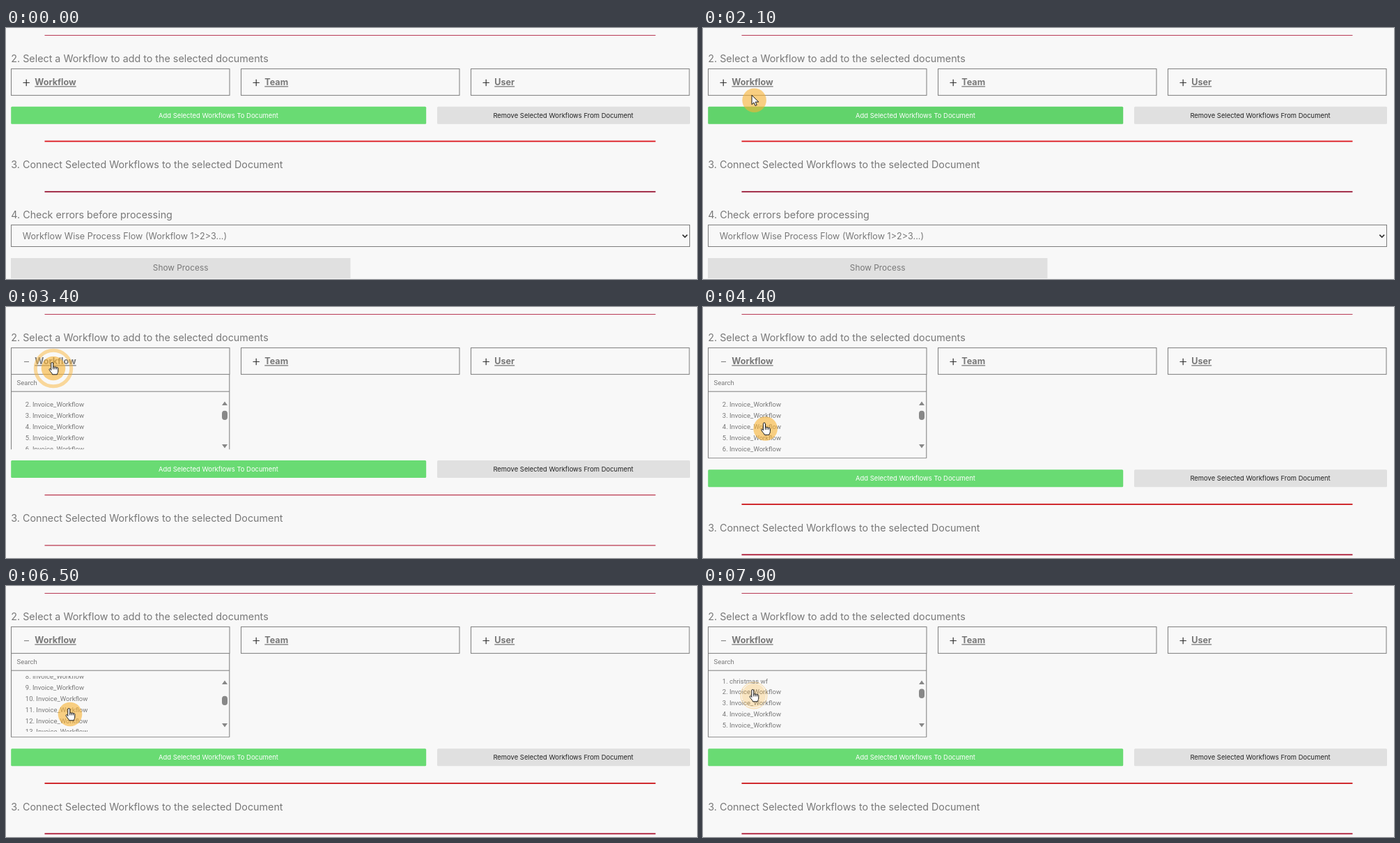
Recreate the animation shown at these times as an HTML page. Size 992x360 px, loop 8000 ms.

```html
<!DOCTYPE html>
<html lang="en">
<head>
<meta charset="utf-8">
<title>Workflow selection</title>
<style>
html, body { margin: 0; width: 100%; height: 100%; overflow: hidden; background: #f8f8f8; }
svg { display: block; width: 992px; height: 360px; }
text { font-family: Inter, "Liberation Sans", sans-serif; fill: #787878; white-space: pre; }
.head { font-size: 14.3px; }
.title { font-size: 12.6px; font-weight: 700; text-decoration: underline; }
.field { font-size: 12.6px; }
.small { font-size: 9.45px; text-anchor: middle; }
.show { font-size: 11.85px; text-anchor: middle; }
.item { font-family: Roboto, "Liberation Sans", sans-serif; font-size: 9.5px; }
.box { fill: none; stroke: #7d7d7d; }
.sign { fill: none; stroke: #333; stroke-width: 1.2; }
.grey { fill: #e0e0e0; }
.bar { fill: #888; }
.glow { fill: #f9b233; }
.ring { fill: none; stroke: #f9b233; }
.pointer { fill: #fff; stroke: #151515; stroke-linejoin: round; stroke-linecap: round; }
</style>
</head>
<body>
<svg viewBox="0 0 992 360">
  <defs>
    <clipPath id="panelClip"><rect id="panelArea" x="0" y="97" width="330" height="0"/></clipPath>
    <clipPath id="listClip"><rect x="8" y="129" width="300" height="80"/></clipPath>
  </defs>

  <rect x="55.5" y="10" width="877" height="1" fill="#b83a55"/>
  <text class="head" x="7.3" y="48.6">2. Select a Workflow to add to the selected documents</text>

  <g id="cards"></g>
  <path id="minus" class="sign" d="M26 78.5h7" style="stroke:#888"/>

  <g clip-path="url(#panelClip)">
    <path class="box" d="M7.5 96v120.8h313.3V96M7.5 121.2h313.3"/>
    <text class="item" x="15.6" y="111.8">Search</text>
    <g clip-path="url(#listClip)"><g id="list"></g></g>
    <path class="bar" d="M310 141l4-5.4 4 5.4zM310 197l4 5.4 4-5.4z"/>
    <rect id="thumb" class="bar" x="310" width="8" height="13.4" rx="4"/>
  </g>

  <g id="below">
    <rect id="add" x="7.2" y="112.8" width="596" height="25" rx="1.5"/>
    <text class="small" x="305" y="128.8" style="fill:#fff">Add Selected Workflows To Document</text>
    <rect class="grey" x="619" y="112.8" width="363" height="25" rx="1.5"/>
    <text class="small" x="800" y="128.8" style="fill:#222">Remove Selected Workflows From Document</text>
    <rect id="rule2" x="55.5" width="877"/>
    <text class="head" x="7.3" y="201.1">3. Connect Selected Workflows to the selected Document</text>
    <rect id="rule3" x="55.5" width="877"/>
    <text class="head" x="7.3" y="273.2">4. Check errors before processing</text>
    <rect class="box" x="7.5" y="282.5" width="974" height="31"/>
    <text class="field" x="23.7" y="303">Workflow Wise Process Flow (Workflow 1&gt;2&gt;3...)</text>
    <path class="sign" d="M971.3 296.6l3.4 3.4 3.4-3.4" style="stroke-width:1.7"/>
    <rect class="grey" x="7" y="330" width="487.5" height="29"/>
    <text class="show" x="250.6" y="348.2">Show Process</text>
  </g>

  <circle id="ring" class="ring"/>
  <g id="cursor">
    <circle id="glow" class="glow" r="17.3"/>
    <path id="arrow" class="pointer" d="M-3.6-7v13l3-2.8 2 4.6 2.2-1-2-4.4h4.2z"/>
    <path id="hand" class="pointer" d="M-3.2 2V-7a1.5 1.5 0 0 1 3 0V-1.6a1.4 1.4 0 0 1 2.4 0 1.4 1.4 0 0 1 2.4.6 1.3 1.3 0 0 1 2.2 1V4c0 2.4-1.4 3-1.4 4.8H-1.4C-1.6 7-4 5.4-5.7 2.4-6.4.8-4.8-.6-3.2 2zM-.2-1.6v2.6M2.2-1.6v2.6M4.6-1v2"/>
  </g>
</svg>
<script>
const LOOP = 8000, STEP = 100, OPEN = 120.5, ROW = 15.87, CLICK = 2800;
const $ = id => document.getElementById(id);
const show = (id, on) => { $(id).style.display = on ? '' : 'none'; };
const set = (el, attrs) => { for (const k in attrs) el.setAttribute(k, attrs[k]); };

function add(parent, tag, attrs, text = '') {
  const el = document.createElementNS('http://www.w3.org/2000/svg', tag);
  set(el, attrs);
  el.textContent = text;
  $(parent).append(el);
}

// Progress from 0 to 1 between two times
const part = (t, from, to) => Math.min(1, Math.max(0, (t - from) / (to - from)));
const easeOut = (t, from, to) => 1 - (1 - part(t, from, to)) ** 2.4;
function smooth(t, from, to) {
  const p = part(t, from, to);
  return p * p * (3 - 2 * p);
}

['Workflow', 'Team', 'User'].forEach((name, i) => {
  const x = 7.5 + 330 * i;
  add('cards', 'rect', { class: 'box', x, y: 58.6, width: 313.5, height: 38 });
  add('cards', 'path', {
    id: 'plus' + i, class: 'sign', d: `M${x + 17} 78.5h9.4m-4.7-4.7v9.4`
  });
  add('cards', 'text', { class: 'title', x: x + 33.8, y: 82.3 }, name);
});

for (let n = 1; n <= 20; n++) {
  const name = n === 1 ? 'christmas wf' : 'Invoice_Workflow';
  add('list', 'text', { class: 'item', x: 27.8, y: 139.6 + (n - 1) * ROW }, `${n}. ${name}`);
}

// Three glides: to the heading, into the list, up to the first rows
function cursorAt(t) {
  const a = easeOut(t, 1100, 2600), b = easeOut(t, 3700, 4830), c = easeOut(t, 7300, 7800);
  return [147 - 79 * a + 24 * b - 19 * c, 307 - 219 * a + 96 * b - 27 * c];
}

const scrollAt = t => 12 - 12 * smooth(t, 4600, 5100) + 88 * smooth(t, 5300, 5800)
  + 62 * smooth(t, 5900, 6200) - 150 * smooth(t, 6200, 7200);

function rule(id, mid, colour, moving) {
  const height = moving ? 1.2 : 1.8;
  set($(id), { y: mid - height / 2, height, fill: moving ? '#b83048' : colour });
}

function drawPanel(t) {
  const shift = OPEN * easeOut(t, 2950, 3700);
  const open = shift === OPEN, moving = shift > 0 && !open;
  const top = scrollAt(t), dark = 8 * (smooth(t, 1800, 2000) - smooth(t, 2100, 2400));
  show('plus0', t < 2900);
  show('minus', t >= 2900);
  set($('panelArea'), { height: shift });
  set($('below'), { transform: `translate(0 ${shift})` });
  set($('list'), { transform: `translate(0 ${-top})` });
  set($('thumb'), { y: 147.6 + top * .086 });
  set($('add'), { fill: `rgb(${105 - dark},${219 - dark},${115 - dark})` });
  rule('rule2', 162.5, open ? '#cc161a' : '#dc161c', moving);
  rule('rule3', 234.8, open ? '#ac1834' : '#981634', moving);
}

function drawCursor(t) {
  const [x, y] = cursorAt(t);
  const start = t > CLICK + 5000 ? CLICK + 5000 : CLICK;
  const age = t - start;
  show('cursor', t >= 1100);
  show('arrow', t < 2300);
  show('hand', t >= 2300);
  set($('cursor'), { transform: `translate(${x} ${y})` });
  set($('glow'), { opacity: .6 - .32 * (part(age, 0, 100) - part(age, 100, 300)) });

  const [cx, cy] = cursorAt(start), width = 5 * part(age, 0, 500);
  show('ring', age > 0 && age < 1250);
  set($('ring'), {
    cx, cy, r: Math.max(0, 17.7 + .0175 * age - width / 2), 'stroke-width': width,
    opacity: .48 * (1 - part(age, 600, 1250))
  });
}

function frame(now) {
  const t = Math.floor(now % LOOP / STEP) * STEP;
  drawPanel(t);
  drawCursor(t);
  requestAnimationFrame(frame);
}
frame(0);
</script>
</body>
</html>
```
